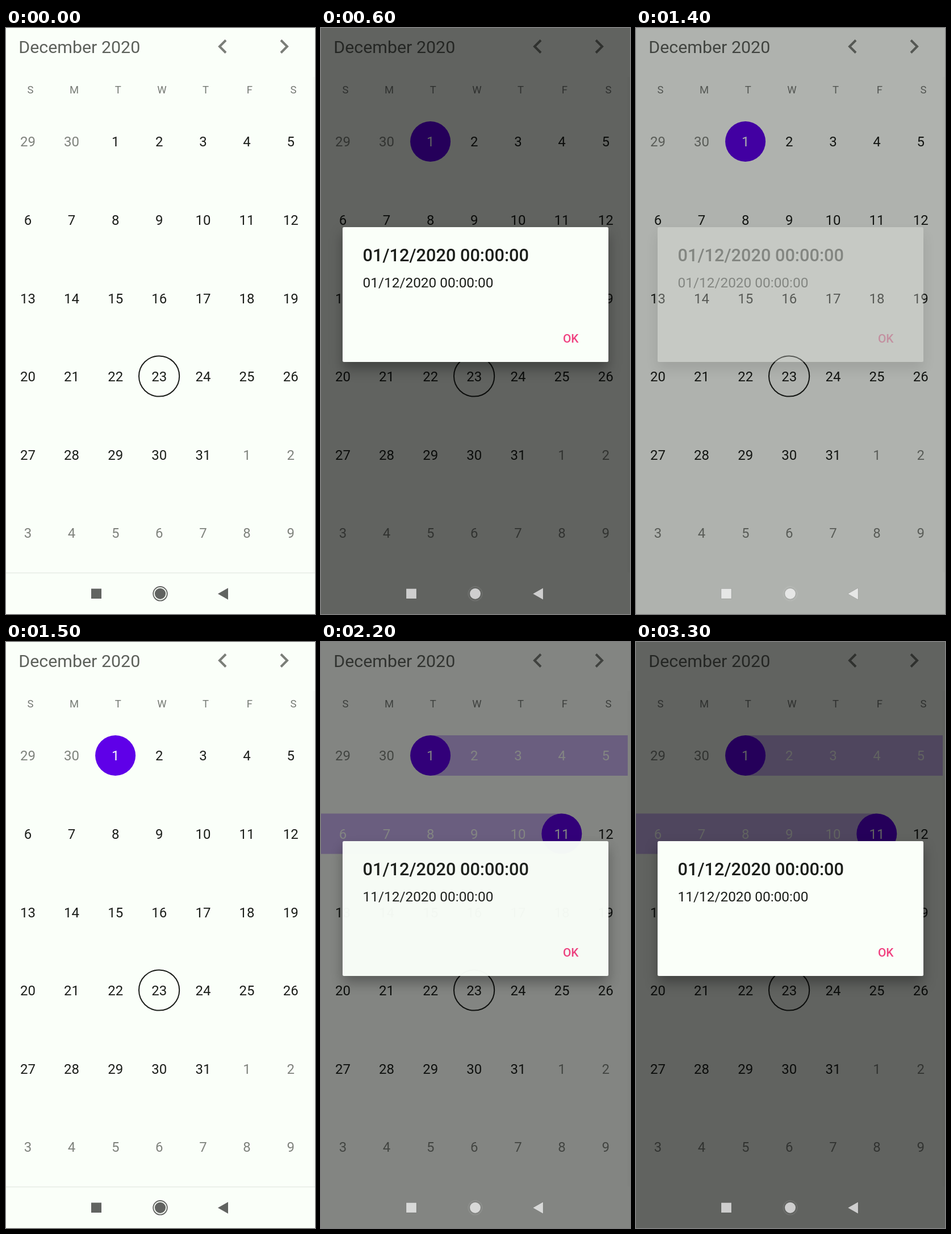
Recreate the animation shown at these times as an HTML page. Size 544 by 1030 pixels, loop 3.4 s.

```html
<!DOCTYPE html>
<html lang="en">
<head>
<meta charset="utf-8">
<title>Calendar range</title>
<style>
  html, body { margin: 0; width: 100%; height: 100%; overflow: hidden; background: #fafff9; }
  svg { display: block; position: absolute; left: 0; top: 0; }
  text { font-family: Roboto, sans-serif; fill: #1b1e1a; }
  .mid { text-anchor: middle; }
  .day { font-size: 24px; }
  .other { fill: #7f837d; }
  .week { font-size: 18.5px; fill: #757974; }
  .on { fill: #fafff9; }
  .pick { fill: #5f00e8; }
  .bar { fill: #cbb4f2; }
  .dark { color: rgba(0, 0, 0, .61); }
  .light { color: rgba(255, 255, 255, .69); }
  .box { fill: #fafff9; filter: drop-shadow(0 12px 11px rgba(0, 0, 0, .32)); }

  #first, #range, #scrim, #dialog, #text1, #text2, .dark, .light {
    animation: 3400ms step-end infinite;
  }
  #first { animation-name: first; }
  #range, #text2 { animation-name: range; }
  #text1 { animation-name: unrange; }
  #scrim { animation-name: scrim; }
  #dialog { animation-name: dialog; }
  .dark { animation-name: dark; }
  .light { animation-name: light; }

  @keyframes first { 0% { opacity: 0 } 8.82%, 100% { opacity: 1 } }
  @keyframes range { 0% { opacity: 0 } 58.82%, 100% { opacity: 1 } }
  @keyframes unrange { 0% { opacity: 1 } 58.82%, 100% { opacity: 0 } }
  @keyframes scrim {
    0% { opacity: 0 }
    11.76% { opacity: .07 }
    14.7% { opacity: .4 }
    17.64% { opacity: .61 }
    41.17% { opacity: .3 }
    44.11% { opacity: 0 }
    61.76% { opacity: .15 }
    64.7% { opacity: .48 }
    67.64%, 100% { opacity: .61 }
  }
  @keyframes dialog {
    0% { opacity: 0 }
    11.76% { opacity: .41 }
    14.7% { opacity: .92 }
    17.64% { opacity: 1 }
    41.17% { opacity: .3 }
    44.11% { opacity: 0 }
    61.76% { opacity: .58 }
    64.7% { opacity: .97 }
    67.64%, 100% { opacity: 1 }
  }
  @keyframes dark {
    0% { opacity: 1 } 14.7% { opacity: 0 }
    44.11% { opacity: 1 } 61.76%, 100% { opacity: 0 }
  }
  @keyframes light {
    0% { opacity: 0 } 14.7% { opacity: 1 }
    44.11% { opacity: 0 } 61.76%, 100% { opacity: 1 }
  }
</style>
</head>
<body>
<svg width="544" height="1030" viewBox="0 0 544 1030">
  <defs>
    <g id="nav" fill="currentColor">
      <rect x="150" y="985.5" width="18" height="17.5"/>
      <circle cx="271.5" cy="994.3" r="9.6"/>
      <circle cx="271.5" cy="994.3" r="12.3" fill="none" stroke="currentColor" stroke-width="1.8"/>
      <path d="M373 994.5L391 984.2V1004.8Z"/>
    </g>
  </defs>

  <rect width="544" height="1030" fill="#fafff9"/>
  <rect x="540" y="86" width="4" height="871" fill="#f6faf4"/>
  <text x="22.2" y="43.8" font-size="30.4" style="fill:#5d615b">December 2020</text>
  <g fill="none" stroke="#7a7e78" stroke-width="4">
    <path d="M387 21.5L376 32.5L387 43.5"/>
    <path d="M484 21.5L495 32.5L484 43.5"/>
  </g>
  <g id="days"></g>
  <circle cx="269.6" cy="612" r="35.6" fill="none" stroke="#1b1e1a" stroke-width="2"/>

  <g id="range">
    <rect class="bar" x="192.5" y="164" width="347.5" height="71"/>
    <rect class="bar" y="301.5" width="423.5" height="71"/>
    <circle class="pick" cx="423.8" cy="337" r="35.5"/>
    <g id="picked"></g>
  </g>
  <g id="first">
    <circle class="pick" cx="192.6" cy="199.5" r="35.5"/>
    <text class="day mid on" x="192.7" y="208.3">1</text>
  </g>

  <rect id="scrim" width="544" height="1030"/>
  <g class="dark">
    <rect y="957" width="544" height="1.5" fill="#000" opacity=".08"/>
    <use href="#nav"/>
  </g>
  <g class="light"><use href="#nav" stroke="#000" stroke-opacity=".12"/></g>

  <g id="dialog">
    <rect class="box" x="38" y="350" width="468" height="237" rx="2.5"/>
    <text x="73.5" y="409.5" font-size="30.7" font-weight="500">01/12/2020 00:00:00</text>
    <g font-size="24.4">
      <text id="text1" x="73.5" y="455.7">01/12/2020 00:00:00</text>
      <text id="text2" x="73.5" y="455.7">11/12/2020 00:00:00</text>
    </g>
    <text x="426" y="553.2" font-size="20.8" font-weight="500" style="fill:#f0417f">OK</text>
  </g>
</svg>
<script>
  const days = document.getElementById('days');
  const picked = document.getElementById('picked');

  function label(parent, str, x, y, cls) {
    const t = document.createElementNS('http://www.w3.org/2000/svg', 'text');
    t.setAttribute('class', 'mid ' + cls);
    t.setAttribute('x', x);
    t.setAttribute('y', y);
    t.textContent = str;
    parent.append(t);
  }

  [...'SMTWTFS'].forEach((c, i) => label(days, c, 43 + i * 77.15, 115, 'week'));

  for (let i = 0; i < 42; i++) {
    const date = new Date(2020, 10, 29 + i);
    const n = date.getDate();
    const inMonth = date.getMonth() === 11;
    const x = 38.4 + (i % 7) * 77.13;
    const y = 208.3 + Math.floor(i / 7) * 137.6;
    label(days, n, x, y, inMonth ? 'day' : 'day other');
    if (inMonth && n <= 11) label(picked, n, x, y, 'day on');
  }
</script>
</body>
</html>
```
